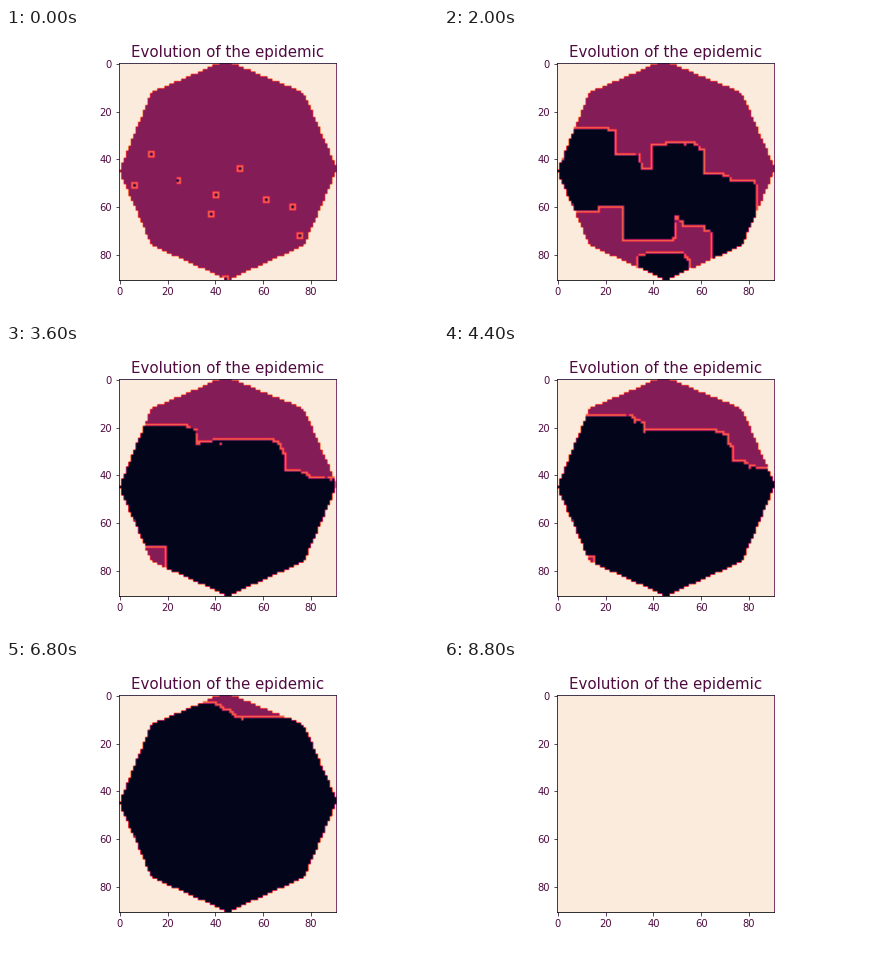
A matplotlib script for the animation above (9800 ms loop, 432 by 288 pixels).

```python
import itertools

import numpy as np
import matplotlib.pyplot as plt
from matplotlib.animation import FuncAnimation
from matplotlib.colors import LinearSegmentedColormap
from matplotlib.path import Path

N = 91
FRAMES, INTERVAL = 49, 200
LAST_SPREAD, WIPE = 42, 44
P_INFECT = 0.8
DEAD, HEALTHY, SICK, EMPTY = range(4)
INK = "#4f0a40"

OCTAGON = [(44, -1.2), (76.6, 12.3), (90.6, 44), (76.8, 76.1),
           (45, 90.5), (13.2, 76.1), (-0.4, 45), (13, 12.3)]
SEEDS = [(13, 38), (6, 51), (24, 49), (40, 55), (38, 63),
         (50, 44), (61, 57), (72, 60), (75, 72), (44, 90)]
NEIGHBOURS = [d for d in itertools.product((-1, 0, 1), repeat=2) if d != (0, 0)]

CMAP = LinearSegmentedColormap.from_list("ember", [
    "#03051a", "#35193e", "#701f57", "#ad1759",
    "#e13342", "#f37651", "#f6b48f", "#faebdd"], N=256)


def start_grid():
    """Octagonal population with a one-cell empty margin around it."""
    ys, xs = np.mgrid[-1:N + 1, -1:N + 1]
    points = np.column_stack([xs.ravel(), ys.ravel()])
    inside = Path(OCTAGON).contains_points(points).reshape(xs.shape)
    inside[[0, -1]] = inside[:, [0, -1]] = False
    grid = np.where(inside, HEALTHY, EMPTY)
    for x, y in SEEDS:
        left = x if (x, y) == (24, 49) else x - 1
        block = grid[y:y + 3, left + 1:x + 3]
        block[block == HEALTHY] = SICK
        grid[y + 1, x + 1] = DEAD
    return grid


def spread(grid, rng):
    """Each sick cell tries to infect its eight neighbours, then dies."""
    sick = grid == SICK
    hit = np.zeros_like(sick)
    for d in NEIGHBOURS:
        hit |= np.roll(sick, d, (0, 1)) & (rng.random(grid.shape) < P_INFECT)
    new = grid.copy()
    new[sick] = DEAD
    new[hit & (grid == HEALTHY)] = SICK
    return new


def simulate():
    rng = np.random.default_rng(7)
    grids = [start_grid()]
    while len(grids) < LAST_SPREAD:
        grids.append(spread(grids[-1], rng))
    over = np.where(grids[0] == EMPTY, EMPTY, DEAD)
    grids += [over] * (WIPE - LAST_SPREAD)
    grids += [np.full_like(over, EMPTY)] * (FRAMES - WIPE)
    return [g[1:-1, 1:-1] for g in grids]


grids = simulate()

plt.rcParams.update({"font.family": "DejaVu Sans", "font.size": 10})
fig = plt.figure(figsize=(6, 4), dpi=72, facecolor="white")
ax = fig.add_subplot()
fig.subplots_adjust(left=0.125, right=0.9, bottom=0.125, top=0.88)
image = ax.imshow(grids[0].astype(float), cmap=CMAP, vmin=DEAD, vmax=EMPTY,
                  interpolation="antialiased")
ax.set_title("Evolution of the epidemic", fontsize=15, color=INK)
ax.set_xticks(range(0, N, 20))
ax.set_yticks(range(0, N, 20))
ax.tick_params(color="#35193e", labelcolor=INK)
for side, color in [("left", "#1a0d30"), ("right", "#5f1450"),
                    ("top", "#1a0d30"), ("bottom", "black")]:
    ax.spines[side].set_color(color)


def update(k):
    image.set_data(grids[k].astype(float))
    return [image]


anim = FuncAnimation(fig, update, frames=FRAMES, interval=INTERVAL,
                     repeat=True, repeat_delay=0)
plt.show()
```
